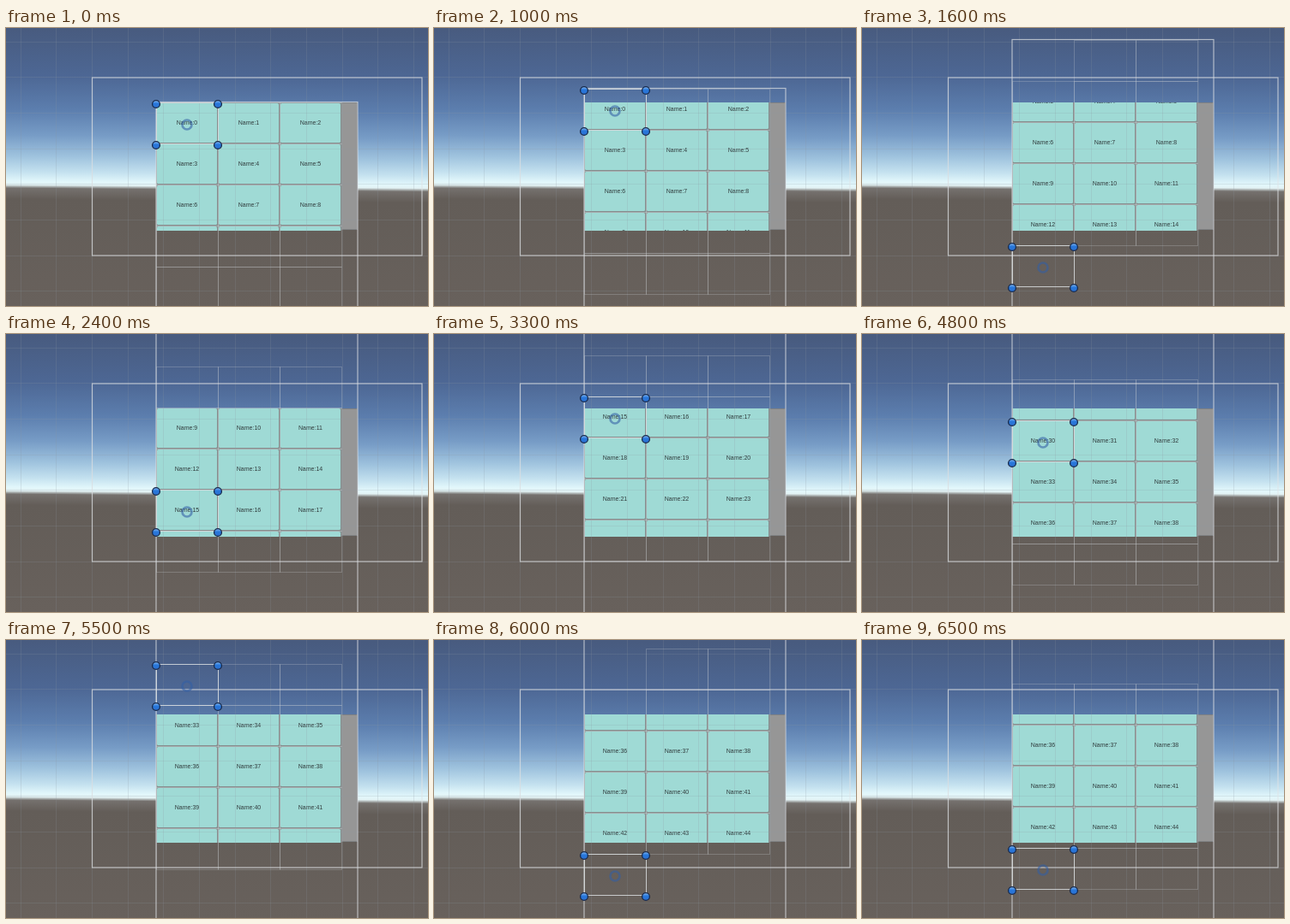
Recreate the animation shown at these times as an HTML page with a canvas. Size 492 by 325 pixels, loop 6600 ms.

```html
<!DOCTYPE html>
<html lang="en">
<head>
<meta charset="utf-8">
<title>Recycled scroll grid</title>
<style>
  html, body { margin: 0; width: 100%; height: 100%; overflow: hidden; background: #665f5a; }
  canvas { display: block; width: 492px; height: 325px; }
</style>
</head>
<body>
<canvas id="stage" width="492" height="325"></canvas>
<script>
const W = 492, H = 325, LOOP = 6600, STEP = 100;
const ctx = document.getElementById('stage').getContext('2d');
const view = { x: 175, y: 87, w: 216, h: 150 };
const cell = { w: 72, h: 48 };
const COLS = 3, POOL_ROWS = 5;

// [time in ms, scroll offset in px]
const scrollKeys = [
  [0, 0], [800, 0], [900, 6], [1400, 56], [1500, 65], [1600, 73], [2200, 126],
  [2400, 145], [2600, 173], [2900, 214], [3000, 227], [3200, 246], [3400, 262],
  [3500, 275], [3800, 309], [3900, 323], [4100, 348], [4200, 366], [4300, 383],
  [4500, 418], [4800, 466], [4900, 480], [5000, 493], [5100, 503], [5500, 539],
  [5600, 544], [5700, 548], [5800, 553], [6200, 561], [6500, 564]
];

function scrollAt(time) {
  const i = scrollKeys.findIndex(key => key[0] >= time);
  if (i < 1) return scrollKeys[0][1];
  const [t0, s0] = scrollKeys[i - 1], [t1, s1] = scrollKeys[i];
  return Math.round(s0 + (s1 - s0) * (time - t0) / (t1 - t0));
}

function line(x1, y1, x2, y2, color, width = 1) {
  ctx.strokeStyle = color;
  ctx.lineWidth = width;
  ctx.beginPath();
  ctx.moveTo(x1, y1);
  ctx.lineTo(x2, y2);
  ctx.stroke();
}

function frame(x, y, w, h, color, width = 1) {
  ctx.strokeStyle = color;
  ctx.lineWidth = width;
  ctx.strokeRect(x, y, w, h);
}

function drawBackground() {
  const fill = ctx.createLinearGradient(0, 0, 0, H);
  const stops = [
    [0, '#485b7f'], [55, '#4d6794'], [95, '#5c7eae'], [125, '#779cc6'],
    [150, '#9fc3de'], [168, '#c4e1ef'], [179, '#e2f7fb'], [183, '#e3f3f5'],
    [187, '#75716e'], [200, '#635d58'], [325, '#68615c']
  ];
  stops.forEach(([y, color]) => fill.addColorStop(y / H, color));
  ctx.save();
  ctx.transform(1, 0.009, 0, 1, 0, 0); // slightly rolled horizon
  ctx.fillStyle = fill;
  ctx.fillRect(0, -10, W, H + 20);
  ctx.restore();
}

function drawGrid() {
  const color = 'rgba(140,150,160,.2)';
  for (let x = 16.5; x < W; x += 41.7) line(Math.round(x) + .5, 0, Math.round(x) + .5, H, color);
  for (let y = 15.5; y < H; y += 41.7) line(0, Math.round(y) + .5, W, Math.round(y) + .5, color);
}

// Each pooled cell jumps down by the pool height; the first column goes first.
function poolCells(scroll) {
  const cells = [];
  for (let slot = 0; slot < POOL_ROWS * COLS; slot++) {
    const col = slot % COLS;
    const limit = 72 + (col ? 5.5 : 0);
    let row = Math.floor(slot / COLS);
    while (scroll >= row * cell.h + limit) row += POOL_ROWS;
    cells.push({
      index: row * COLS + col,
      x: view.x + col * cell.w,
      y: view.y + row * cell.h - scroll
    });
  }
  return cells;
}

function drawCells(cells) {
  ctx.save();
  ctx.beginPath();
  ctx.rect(view.x, view.y, view.w, view.h);
  ctx.clip();
  ctx.font = '7px "Liberation Sans", Arial, sans-serif';
  ctx.textAlign = 'center';
  ctx.textBaseline = 'middle';
  for (const { x, y, index } of cells) {
    ctx.fillStyle = '#858e8e';
    ctx.fillRect(x, y, cell.w, cell.h);
    ctx.fillStyle = '#9fdad5';
    ctx.beginPath();
    ctx.roundRect(x + 1, y + 1, cell.w - 2, cell.h - 2, 1.5);
    ctx.fill();
    ctx.fillStyle = '#303b3c';
    ctx.fillText('Name:' + index, x + cell.w / 2, y + cell.h / 2 + .5);
  }
  ctx.restore();
}

function drawHandle(x, y) {
  ctx.beginPath();
  ctx.arc(x, y, 4.4, 0, Math.PI * 2);
  const fill = ctx.createLinearGradient(0, y - 4, 0, y + 4);
  fill.addColorStop(0, '#83b8f2');
  fill.addColorStop(.4, '#2878dc');
  fill.addColorStop(1, '#2b70d0');
  ctx.fillStyle = fill;
  ctx.fill();
  ctx.strokeStyle = '#18294a';
  ctx.lineWidth = 1.3;
  ctx.stroke();
}

function drawSelection({ x, y }) {
  frame(x + .5, y + .5, cell.w, cell.h, 'rgba(225,228,230,.75)');
  ctx.beginPath();
  ctx.arc(x + 36, y + 26, 5.5, 0, Math.PI * 2);
  ctx.strokeStyle = 'rgba(50,95,165,.58)';
  ctx.lineWidth = 2.6;
  ctx.stroke();
  for (const dy of [2, 50]) for (const dx of [0, cell.w]) drawHandle(x + dx, y + dy);
}

function draw(time) {
  const scroll = scrollAt(time);
  const cells = poolCells(scroll);
  const top = view.y - scroll;

  drawBackground();
  ctx.fillStyle = '#969696';
  ctx.fillRect(391, 87, 19, 149);
  frame(391.5, 87.5, 18, 148, '#7f8183');
  drawCells(cells);
  drawGrid();

  for (const { x, y } of cells) frame(x + .5, y + .5, cell.w, cell.h, 'rgba(205,210,212,.26)');
  frame(100.5, 58, 384.5, 208, 'rgba(225,228,230,.72)', 1.2);
  frame(175, top - .5, 235, 2000, 'rgba(220,224,226,.72)', 1.2);
  drawSelection(cells[0]);
}

function tick(now) {
  draw(Math.floor(now % LOOP / STEP) * STEP);
  requestAnimationFrame(tick);
}

draw(0);
requestAnimationFrame(tick);
</script>
</body>
</html>
```
